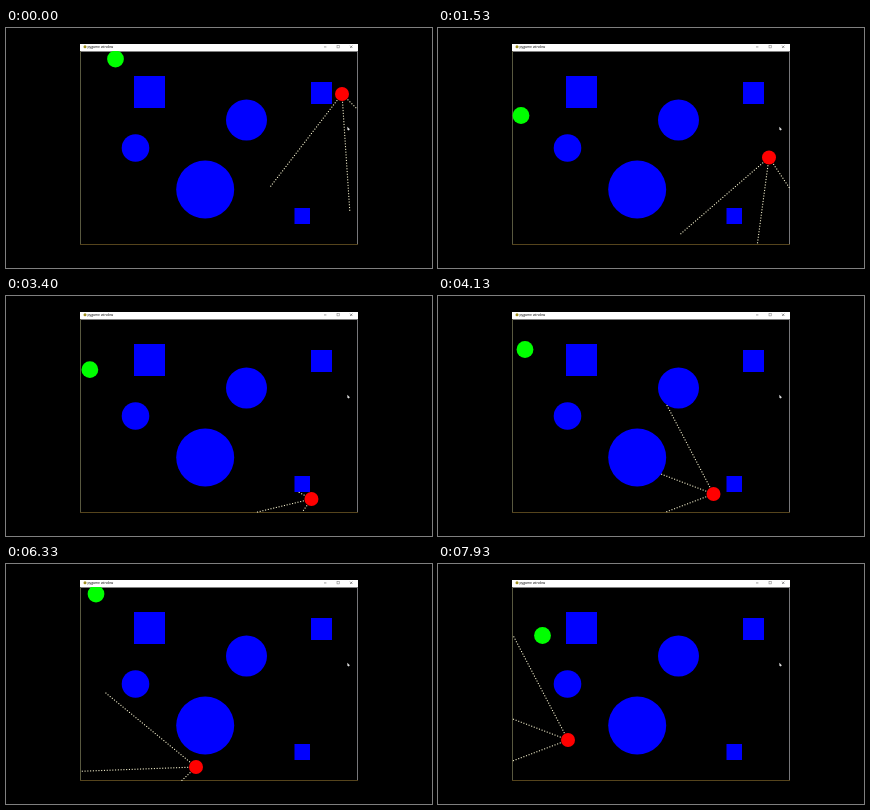
Recreate the animation shown at these times as an HTML page with a canvas. Size 426 by 240 pixels, loop 8000 ms.

```html
<!DOCTYPE html>
<html>
<head>
<meta charset="utf-8">
<style>
html, body { margin: 0; width: 100%; height: 100%; overflow: hidden; background: #000; }
canvas { display: block; }
</style>
</head>
<body>
<canvas id="stage" width="426" height="240"></canvas>
<script>
const ctx = document.getElementById('stage').getContext('2d');
const LOOP = 8000, STEPS = 120;
const SPACING = 2.775;              // one drive step, and the gap between sensor dots
const BASE = 86.2 * Math.PI / 180;  // heading at turn level 0
const TURN = 0.2, SPREAD = 41.5 * Math.PI / 180;
const BOX = { left: 74.5, top: 23, right: 351.5, bottom: 216.5 };

const squares = [
  { x: 128, y: 48, w: 31, h: 32 },
  { x: 305, y: 54, w: 21, h: 22 },
  { x: 288.5, y: 180, w: 15.5, h: 16 }
];
const circles = [
  { x: 240.5, y: 92, r: 20.5 },
  { x: 129.5, y: 120, r: 13.8 },
  { x: 199.2, y: 161.5, r: 29 }
];

// Waypoints; level counts the turns away from the base heading.
const carKeys = [
  { step: 0, x: 336, y: 66, level: 0 },
  { step: 23, x: 331, y: 129.5, level: 1 },
  { step: 41, x: 323, y: 181, level: 2 },
  { step: 50, x: 308, y: 202, level: 6 },
  { step: 62, x: 275.5, y: 198, level: 10 },
  { step: 75, x: 242.5, y: 184, level: 9 },
  { step: 95, x: 190, y: 203, level: 8 },
  { step: 119, x: 130, y: 176, level: 10 }
];
const greenKeys = [
  { step: 0, x: 109.5, y: 31 },
  { step: 23, x: 83, y: 87.5 },
  { step: 41, x: 81, y: 92 },
  { step: 62, x: 87, y: 53.5 },
  { step: 75, x: 82.5, y: 60 },
  { step: 95, x: 90, y: 30 },
  { step: 119, x: 104.5, y: 71.5 }
];

function span(keys, step) {
  const i = Math.max(1, keys.findIndex(key => key.step >= step));
  const a = keys[i - 1], b = keys[i], steps = b.step - a.step;
  return { a, b, steps, u: (step - a.step) / steps };
}

function greenAt(step) {
  const { a, b, u } = span(greenKeys, step);
  return { x: a.x + (b.x - a.x) * u, y: a.y + (b.y - a.y) * u, r: 8.4 };
}

// Cubic Hermite curve: returns value and slope at u.
function hermite(p, q, m, n, u) {
  const c2 = 3 * (q - p) - 2 * m - n, c3 = 2 * (p - q) + m + n;
  return [p + u * (m + u * (c2 + u * c3)), m + u * (2 * c2 + 3 * u * c3)];
}

// The car follows a smooth curve and turns in whole levels.
function carAt(step) {
  const { a, b, steps, u } = span(carKeys, step);
  const speed = SPACING * steps;
  const from = BASE + a.level * TURN, to = BASE + b.level * TURN;
  const [x, dx] = hermite(a.x, b.x, speed * Math.cos(from), speed * Math.cos(to), u);
  const [y, dy] = hermite(a.y, b.y, speed * Math.sin(from), speed * Math.sin(to), u);
  const tangent = (Math.atan2(dy, dx) + 2 * Math.PI) % (2 * Math.PI);
  return { x, y, r: 7, heading: BASE + Math.round((tangent - BASE) / TURN) * TURN };
}

function disc({ x, y, r }, color) {
  ctx.fillStyle = color;
  ctx.beginPath();
  ctx.arc(x, y, r, 0, 2 * Math.PI);
  ctx.fill();
}

function rect(x, y, w, h, color) {
  ctx.fillStyle = color;
  ctx.fillRect(x, y, w, h);
}

function blocked(x, y, green) {
  return x <= BOX.left || x >= BOX.right || y <= BOX.top || y >= BOX.bottom ||
    squares.some(s => x >= s.x && x <= s.x + s.w && y >= s.y && y <= s.y + s.h) ||
    [...circles, green].some(c => Math.hypot(x - c.x, y - c.y) <= c.r);
}

function drawSensor(car, angle, green) {
  for (let i = 3; i <= 42; i++) {
    const x = car.x + i * SPACING * Math.cos(angle);
    const y = car.y + i * SPACING * Math.sin(angle);
    if (blocked(x, y, green)) return;
    rect(x - 0.55, y - 0.55, 1.1, 1.1, '#f2eecb');
  }
}

function drawWindow() {
  rect(74, 16, 278, 7.5, '#fff');
  disc({ x: 79, y: 18.8, r: 1.5 }, '#a09020');
  ctx.fillStyle = '#000';
  ctx.font = '3.4px "Open Sans", sans-serif';
  ctx.fillText('pygame window', 81.5, 20);
  rect(318, 18.6, 2.4, 0.7, '#777');
  ctx.lineWidth = 0.5;
  ctx.strokeStyle = '#777';
  ctx.strokeRect(331, 17.7, 2.2, 2.2);
  ctx.strokeStyle = '#333';
  ctx.beginPath();
  ctx.moveTo(344, 17.6); ctx.lineTo(346.4, 20);
  ctx.moveTo(346.4, 17.6); ctx.lineTo(344, 20);
  ctx.stroke();
  rect(74, 23, 1, 194, '#58583f');
  rect(351, 23, 1, 194, '#77777a');
  rect(74, 216, 278, 1, '#55441c');
}

function drawCursor() {
  ctx.fillStyle = '#ddd';
  ctx.beginPath();
  ctx.moveTo(341.3, 98.8); ctx.lineTo(343.8, 101.2);
  ctx.lineTo(342.8, 102.6); ctx.lineTo(341.4, 101.8);
  ctx.fill();
}

function draw(time) {
  const step = Math.min(STEPS - 1, Math.floor((time % LOOP) * STEPS / LOOP + 0.05));
  const car = carAt(step), green = greenAt(step);
  rect(0, 0, 426, 240, '#000');
  drawWindow();
  ctx.save();
  ctx.beginPath();
  ctx.rect(74, 23, 278, 194);
  ctx.clip();
  squares.forEach(s => rect(s.x, s.y, s.w, s.h, '#00f'));
  circles.forEach(c => disc(c, '#00f'));
  disc(green, '#0f0');
  for (const side of [-1, 0, 1]) drawSensor(car, car.heading + side * SPREAD, green);
  disc(car, '#f00');
  ctx.restore();
  drawCursor();
}

const begin = performance.now();
function tick() {
  draw(performance.now() - begin);
  requestAnimationFrame(tick);
}
tick();
</script>
</body>
</html>
```
